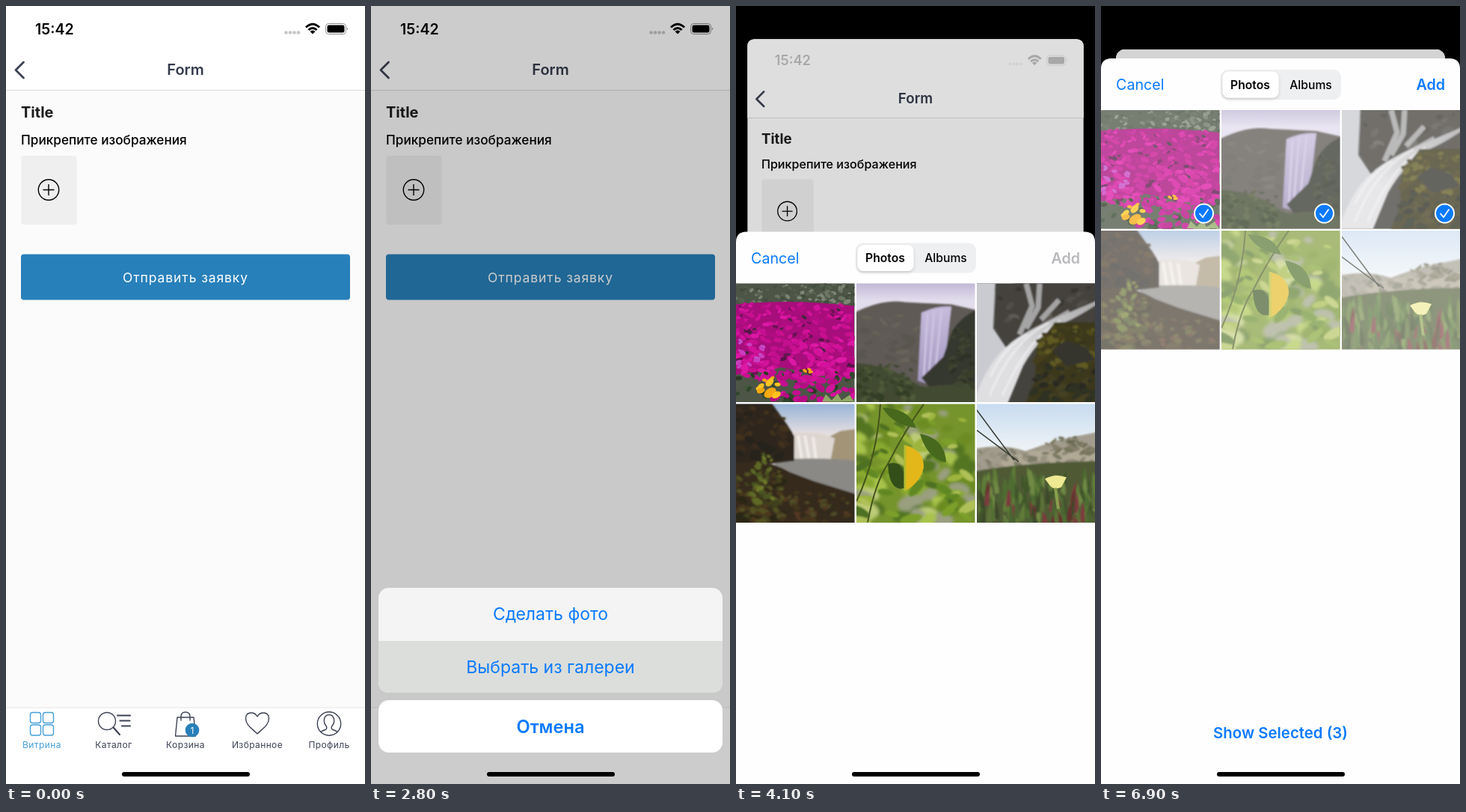
An HTML page that plays this animation: 480 px wide and 1039 px high, repeating every 8 s.

```html
<!DOCTYPE html>
<html lang="ru">
<head>
<meta charset="utf-8">
<title>Form</title>
<style>
  html, body { margin: 0; width: 100%; height: 100%; overflow: hidden; background: #000; }
  #stage { display: block; width: 100vw; height: 100vh; }
  text { font-family: Inter, Roboto, sans-serif; }
  .mid { text-anchor: middle; }
  .tab { font-size: 12px; letter-spacing: .4px; fill: #3d4354; text-anchor: middle; }
  .action { font-size: 23px; fill: #0a7aff; text-anchor: middle; }
  .bar { font-size: 19.7px; fill: #0a7aff; }
  .segment { font-size: 15.7px; text-anchor: middle; }
  .bold { font-weight: 600; }
  .line { fill: none; stroke: #3d4354; stroke-width: 1.4; stroke-linejoin: round; stroke-linecap: round; }
</style>
</head>
<body>
<svg id="stage" viewBox="0 0 480 1039" preserveAspectRatio="none">
  <defs>
    <clipPath id="cardClip"><rect id="cardShape" width="480" height="1039"/></clipPath>
    <linearGradient id="sky" x2="0" y2="1"><stop stop-color="#86abd6"/><stop offset=".28" stop-color="#e6dfe0"/></linearGradient>
    <linearGradient id="paleSky" x2="0" y2="1"><stop stop-color="#c3d8ef"/><stop offset=".4" stop-color="#eef3f6"/></linearGradient>
    <linearGradient id="lavenderSky" x2="0" y2="1"><stop stop-color="#b5aacd"/><stop offset=".18" stop-color="#e2dded"/></linearGradient>
    <linearGradient id="falls" x2="0" y2="1"><stop stop-color="#c6bcdc"/><stop offset="1" stop-color="#a196be"/></linearGradient>
    <linearGradient id="stream" x1="1" x2="0" y2="1"><stop stop-color="#a9a8a9"/><stop offset=".6" stop-color="#dfdfe2"/></linearGradient>
    <filter id="soft"><feGaussianBlur stdDeviation="2"/></filter>
    <filter id="haze"><feGaussianBlur stdDeviation=".9"/></filter>
    <filter id="lift" x="-10%" y="-10%" width="120%" height="140%"><feDropShadow dx="0" dy="2" stdDeviation="2" flood-opacity=".16"/></filter>
  </defs>
  <rect width="480" height="1039"/>

  <g id="card" clip-path="url(#cardClip)">
    <rect width="480" height="1039" fill="#fbfbfb"/>
    <rect width="480" height="112" fill="#fff"/>
    <path d="M0 112.5H480" stroke="#d8dadc"/>
    <g id="status">
      <text x="39" y="37.5" font-size="19.500" class="bold">15:42</text>
      <g fill="#c6c6c8"><circle cx="374.500" cy="35.500" r="2.300"/><circle cx="380" cy="35.500" r="2.300"/><circle cx="385.500" cy="35.500" r="2.300"/><circle cx="391" cy="35.500" r="2.300"/></g>
      <g fill="none" stroke="#000" stroke-width="3"><path d="M401 28.500Q410 20 419 28.500M404.500 32Q410 27 415.500 32"/></g>
      <path d="M406.500 34Q410 31 413.500 34L410 37.500Z"/>
      <rect x="427.500" y="23.500" width="27" height="14" rx="4" fill="none" stroke="#8e8e90"/>
      <rect x="429.500" y="25.500" width="23" height="10" rx="2.300"/>
      <path d="M456 28.500q2.500 2 0 4z" fill="#8e8e90"/>
    </g>
    <path d="M23.500 75L13 85.500L23.500 96" class="line" style="stroke-width:2.800"/>
    <text x="240" y="92" font-size="20" class="mid bold" fill="#343b4c">Form</text>
    <text x="20" y="149" font-size="20" font-weight="700" fill="#1d1d1f">Title</text>
    <text x="20" y="185" font-size="17.200" font-weight="500">Прикрепите изображения</text>
    <rect x="20.500" y="200" width="74" height="92" rx="4" fill="#efefef"/>
    <g fill="none" stroke="#000" stroke-width="1.400"><circle cx="57" cy="245.500" r="13.700"/><path d="M49.500 245.500h15M57 238v15"/></g>
    <rect x="20" y="331.500" width="440" height="61" rx="4" fill="#2880ba"/>
    <text x="240" y="368.500" font-size="17.500" class="mid" letter-spacing=".9" fill="#fff">Отправить заявку</text>

    <rect y="937" width="480" height="102" fill="#fff"/>
    <path d="M0 937H480" stroke="#e6e6e6"/>
    <g class="line" style="stroke:#46a0d8"><rect x="32.500" y="943.500" width="14" height="14" rx="3"/><rect x="49.500" y="943.500" width="14" height="14" rx="3"/><rect x="32.500" y="960" width="14" height="14" rx="3"/><rect x="49.500" y="960" width="14" height="14" rx="3"/></g>
    <g class="line">
      <circle cx="135" cy="955" r="11.500"/>
      <path d="M143.500 963.500L152 973M149 947.500h17M152.500 954.500h13M155 961.500h11" stroke-width="2.200"/>
      <path d="M229 950h22l2.500 25h-27zM234 954v-5q0-6 6-6t6 6v5"/>
      <path d="M336 972C329 965 320.500 960 320.500 951.500C320.500 942.500 332 941.500 336 949C340 941.500 351.500 942.500 351.500 951.500C351.500 960 343 965 336 972Z"/>
      <circle cx="432" cy="958.500" r="15.700"/>
      <path d="M421 969.500Q423 967.500 427 966.500Q429.500 965.500 428.500 962Q424.500 958 425.500 952Q427 946.500 432 946.500Q437 946.500 438.500 952Q439.500 958 435.500 962Q434.500 965.500 437 966.500Q441 967.500 443 969.500"/>
    </g>
    <circle cx="249" cy="967" r="9.300" fill="#2880ba"/>
    <text x="249" y="971.500" font-size="12" class="mid" fill="#fff">1</text>
    <g id="tabs"></g>
    <rect id="dim" width="480" height="1039" opacity="0"/>
  </g>

  <g id="sheet">
    <rect x="10" y="777" width="460" height="140" rx="14" fill="#f4f4f4"/>
    <path id="pressed" d="M10 848H470V903Q470 917 456 917H24Q10 917 10 903Z" fill="#dbdedb"/>
    <path id="divider" d="M10 847.500H470" stroke="#dedede"/>
    <rect x="10" y="927" width="460" height="70" rx="14" fill="#fff"/>
    <text x="240" y="820" class="action">Сделать фото</text>
    <text x="240" y="891" class="action">Выбрать из галереи</text>
    <text x="240" y="971" class="action bold" style="font-size:23.700px">Отмена</text>
  </g>

  <g id="picker">
    <path d="M0 1039V84Q0 70 14 70H466Q480 70 480 84V1039Z" fill="#fefefe"/>
    <text x="20" y="112" class="bar">Cancel</text>
    <text x="460" y="112" class="bar bold" text-anchor="end" id="add">Add</text>
    <rect x="160" y="85" width="161" height="40" rx="10" fill="#eeeff1"/>
    <rect x="162.500" y="87.500" width="75" height="35" rx="8" fill="#fff" filter="url(#lift)"/>
    <text x="199.500" y="110.500" class="segment bold">Photos</text>
    <text x="280.500" y="110.500" class="segment" font-weight="500">Albums</text>
    <g id="photos"></g>
    <text x="240" y="978" class="bar bold mid" style="font-size:20.400px" id="summary">Select Photos</text>
  </g>
  <rect x="155" y="1023" width="171" height="6" rx="3"/>
</svg>

<script>
const $ = id => document.getElementById(id);
let seed = 7;
const rand = (lo = 0, hi = 1) => {
  seed = (seed * 16807) % 2147483647;
  return lo + (hi - lo) * seed / 2147483647;
};
const pick = list => list[Math.floor(rand(0, list.length))];
const path = (d, fill, extra = '') => `<path d="${d}" fill="${fill}" ${extra}/>`;
const fill = color => `<rect x="-9" y="-9" width="176" height="176" fill="${color}"/>`;
const blur = (id, art) => `<g filter="url(#${id})">${art}</g>`;

// Scatter rotated ellipses within a box; they grow toward its lower edge.
function blobs(count, [x0, y0, x1, y1], size, colors, flat = .6) {
  let out = '';
  for (let i = 0; i < count; i++) {
    const x = rand(x0, x1), y = y0 + (y1 - y0) * (i + .5) / count;
    const r = size * rand(.5, 1) * (.6 + .6 * i / count);
    out += `<ellipse rx="${r}" ry="${r * flat}" fill="${pick(colors)}" transform="translate(${x} ${y}) rotate(${rand(-50, 50)})"/>`;
  }
  return out;
}

function blades(count, base, height, colors) {
  let out = '';
  for (let i = 0; i < count; i++) {
    const x = rand(0, 158), y = base + 60 * i / count, h = height * rand(.6, 1.1);
    out += path(`M${x - 3} ${y}Q${x - 4} ${y - h / 2} ${x + rand(-5, 5)} ${y - h}Q${x + 4} ${y - h / 2} ${x + 3} ${y}Z`, pick(colors));
  }
  return out;
}

const flowers = () => fill('#4c5546')
  + blobs(110, [0, 0, 158, 28], 5, ['#55604e', '#6a7463', '#434d3e', '#7d8674'])
  + path('M0 28Q70 20 158 30V126L110 122L60 112L0 122Z', '#a80d7c')
  + blobs(60, [0, 30, 158, 125], 6, ['#581447', '#40283c', '#6d1254'], .5)
  + blobs(240, [0, 27, 158, 130], 8, ['#d3129b', '#dc18a4', '#c40f90', '#c9108f', '#b30c83'], .5)
  + blobs(14, [0, 75, 40, 112], 6, ['#bd4fc8', '#c93fc0'])
  + blobs(40, [0, 116, 158, 160], 7, ['#30462d', '#47573d', '#2a3923'])
  + blobs(40, [50, 112, 158, 158], 8, ['#d3129b', '#b50c83', '#c40f90'])
  + blobs(9, [30, 125, 58, 150], 9, ['#f5a912', '#ffc321'], .65)
  + blobs(3, [92, 114, 100, 119], 6, ['#f5a912'])
  + path('M115 158L120 148L128 156L136 147L141 156L152 149L158 158Z', '#91a866');

const lavenderFalls = () => fill('url(#lavenderSky)') + blur('haze',
  path('M-5 40Q35 20 65 25L127 28L163 36V163H-5Z', '#5e5a54')
  + blobs(30, [0, 42, 85, 105], 12, ['#59564f', '#67635a', '#605c57'], .35)
  + path('M87 39Q108 29 127 31L120 90L104 137L82 130Z', 'url(#falls)')
  + path('M95 40L90 125M104 36L96 132M114 34L105 120', 'none', 'stroke="#cfc5e2" stroke-width="2.500"')
  + path('M-5 106Q45 108 78 133Q90 145 163 128V163H-5Z', '#424b30')
  + path('M163 34Q138 45 127 66L116 98L87 126L97 138L163 132Z', '#35372d')
  + blobs(65, [0, 108, 75, 158], 6, ['#3b452d', '#4f5a39', '#323d26'])
  + blobs(45, [126, 60, 158, 140], 6, ['#2f3227', '#404432', '#393c2c']));

const mossyStream = () => fill('#45433e') + blur('haze',
  path('M-5 -5H25L22 60L42 90L20 163H-5Z', '#c9cbd0')
  + path('M25 12L60 -5H163V65L90 70L45 82L24 60Z', '#45433e')
  + blobs(32, [28, 5, 152, 60], 9, ['#514e48', '#37352d', '#5d5a54', '#45433a'])
  + path('M66 0L74 30L57 68M84 0L82 32L66 60M110 22L86 48M124 38L78 64', 'none', 'stroke="#a5a4a4" stroke-width="7" stroke-linejoin="round"')
  + path('M163 26Q135 45 115 53Q85 70 62 110L40 163H-5Q10 110 40 84Q65 62 116 42L163 22Z', 'url(#stream)')
  + path('M112 50Q70 70 34 150M96 53Q48 75 17 150M67 68Q32 90 18 125', 'none', 'stroke="#f4f4f6" stroke-width="3" opacity=".6"')
  + path('M80 84L104 52L163 51V163H64L78 130Z', '#3b371d')
  + blobs(65, [82, 57, 158, 110], 8, ['#4f4b1f', '#443d1b', '#615a24', '#38341e'])
  + blobs(45, [72, 108, 158, 158], 9, ['#2f3024', '#454123', '#292a22'])
  + path('M100 89L119 76L146 85L158 102L120 111Z', '#34362d'));

const coastFalls = () => fill('url(#sky)') + blur('haze',
  path('M120 46L140 36L163 33V84H120Z', '#a39478')
  + path('M72 40Q110 34 132 46L126 78H76Z', '#ddd6d0')
  + path('M83 42L88 74M92 42L98 75M103 44L107 74', 'none', 'stroke="#efebe6" stroke-width="4"')
  + path('M52 75Q105 70 163 76V124H52Z', '#8b8985')
  + path('M-5 -5H45L68 27L78 43V76L45 80L-5 88Z', '#2d261c')
  + blobs(35, [0, 5, 68, 72], 9, ['#382b1c', '#27221a', '#42331f'])
  + path('M-5 80Q38 70 72 91L104 103L163 121V163H-5Z', '#352a1a')
  + blobs(100, [0, 90, 65, 158], 7, ['#48381e', '#40411f', '#2a2618', '#545124'])
  + blobs(55, [60, 118, 155, 158], 7, ['#523821', '#30291b', '#42341f', '#4f4c26'])
  + blobs(26, [22, 66, 50, 132], 6, ['#5f6a26', '#4a5622', '#6f7a2a']));

const leaves = () => fill('#76942c')
  + blur('soft', blobs(70, [0, 0, 158, 158], 20, ['#a8c34b', '#6c8c24', '#bccb76', '#527520', '#88a92f', '#9a9f80']))
  + blur('haze', blobs(46, [0, 10, 158, 158], 15, ['#7c9f2a', '#4d7020', '#9db53c', '#618824', '#aec057'], .4))
  + path('M32 0Q28 70 0 130M90 0Q65 35 42 80Q25 105 15 158', 'none', 'stroke="#46551c" stroke-width="2"')
  + path('M35 5Q70 5 80 32Q48 28 35 5ZM85 40Q118 45 120 78Q95 73 85 40Z', '#47691d')
  + path('M42 80Q66 72 65 112Q44 119 42 80Z', '#344e1a')
  + path('M65 55Q91 62 90 85Q84 107 65 116Z', '#e3b719')
  + path('M65 55V116', 'none', 'stroke="#b5bd2e" stroke-width="3"');

const dunes = () => fill('url(#paleSky)') + blur('haze',
  path('M-5 60Q35 52 65 63L105 49L163 37V115H-5Z', '#a19c8e')
  + path('M35 74Q75 58 112 62L163 54V96H20Z', '#b0a995')
  + blobs(40, [0, 60, 158, 84], 9, ['#8b8776', '#9a9482', '#7d7b68'], .4)
  + blobs(26, [90, 44, 158, 66], 8, ['#77765c', '#857f6a', '#6b6c55'], .4)
  + path('M-5 90Q60 78 163 76V163H-5Z', '#4f5a34')
  + blades(100, 105, 26, ['#607d39', '#4f6d32', '#708a45', '#40572c'])
  + blades(60, 130, 28, ['#65302e', '#4b6433', '#7c3a3d', '#5b7138', '#3d492b']))
  + path('M0 35L56 77M0 8Q25 42 50 75', 'none', 'stroke="#353a30" stroke-width="1.500"')
  + path('M91 100Q105 92 120 98L113 111Q103 116 97 108Z', '#efe993')
  + path('M105 112L109 140', 'none', 'stroke="#89a04d" stroke-width="4"');

const scenes = [flowers, lavenderFalls, mossyStream, coastFalls, leaves, dunes];
$('photos').innerHTML = scenes.map((draw, i) => `
  <svg x="${i % 3 * 161}" y="${i < 3 ? 139 : 300}" width="158.500" height="158.500" overflow="hidden">
    ${draw()}
    <rect class="veil" width="159" height="159" fill="#fff"/>
    <g class="check"><circle cx="137.500" cy="138" r="12.500" fill="#0a7aff" stroke="#fff" stroke-width="2"/>
    <path d="M132 138.500l4 4.500l7-10" fill="none" stroke="#fff" stroke-width="1.800" stroke-linecap="round"/></g>
  </svg>`).join('');
$('tabs').innerHTML = ['Витрина', 'Каталог', 'Корзина', 'Избранное', 'Профиль'].map((label, i) =>
  `<text x="${48 + 96 * i}" y="991" class="tab" ${i ? '' : 'style="fill:#46a0d8"'}>${label}</text>`).join('');

const veils = [...document.querySelectorAll('.veil')];
const checks = [...document.querySelectorAll('.check')];
const LOOP = 8000, STEP = 100;
const SELECT_TIMES = [5500, 6100, 6700];
const clamp = v => Math.min(1, Math.max(0, v));
const set = (id, name, value) => $(id).setAttribute(name, value);
const show = (node, on) => { node.style.display = on ? '' : 'none'; };

// Critically damped spring settling from 0 to 1.
function spring(t, start) {
  const x = Math.max(0, t - start) * .017;
  return 1 - (1 + x) * Math.exp(-x);
}

function render(t) {
  const sheet = spring(t, 1188) - spring(t, 2880);
  show($('sheet'), t >= 1200 && t < 3400);
  set('sheet', 'transform', `translate(0 ${262 * (1 - sheet)})`);
  show($('pressed'), t >= 2800);
  show($('divider'), t < 2800);

  const present = spring(t, 3938);
  set('card', 'transform', `translate(${20 * present} ${58 * present}) scale(${1 - present / 12})`);
  set('cardShape', 'rx', 13 * present);
  set('status', 'opacity', 1 - present);
  const sheetDim = t < 2800 ? clamp((t - 1150) / 250) : t < 3400 ? sheet : 0;
  set('dim', 'opacity', .2 * sheetDim + .17 * present);
  show($('picker'), t >= 3900);
  set('picker', 'transform', `translate(0 ${969 * (1 - present)})`);

  const count = SELECT_TIMES.filter(start => t >= start).length;
  veils.forEach((veil, i) => {
    const opacity = i < 3 ? (i < count ? .24 : 0) : .36 * clamp((t - 6600) / 300);
    veil.setAttribute('opacity', opacity);
    show(checks[i], i < count);
  });
  $('add').style.fill = count ? '#0a7aff' : '#b9b9bd';
  $('summary').style.fill = count ? '#0a7aff' : '#000';
  $('summary').textContent = count ? `Show Selected (${count})` : 'Select Photos';
}

const began = performance.now();
function tick() {
  const t = (performance.now() - began) % LOOP;
  render(Math.floor(t / STEP) * STEP);
  requestAnimationFrame(tick);
}
tick();
</script>
</body>
</html>
```
